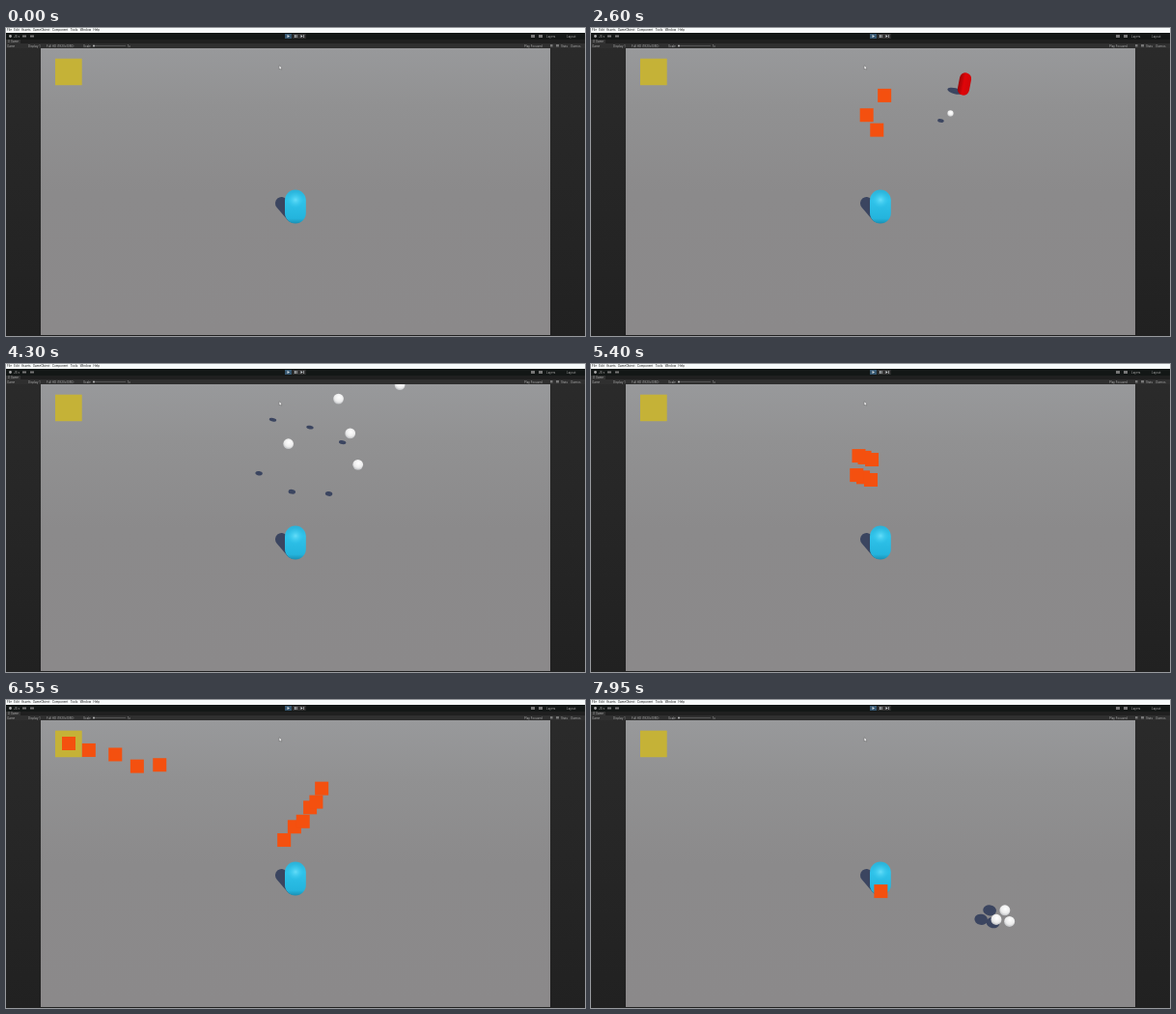
Animation of 600 by 319 pixels, one loop 8 s. Source, as an HTML page:

```html
<!DOCTYPE html>
<html lang="en">
<head>
<meta charset="utf-8">
<title>Loot pickup</title>
<style>
  html, body { margin: 0; width: 100%; height: 100%; overflow: hidden; background: #262626; }
  svg { display: block; width: 100vw; height: 100vh; }
  text { font: 3px Inter, Roboto, sans-serif; fill: #aaa; }
  .menu { fill: #111; word-spacing: 1.5px; }
</style>
</head>
<body>
<svg viewBox="0 0 600 319" preserveAspectRatio="none">
  <defs>
    <linearGradient id="ground" x1="0" y1="0" x2="0" y2="1">
      <stop offset="0" stop-color="#98999b"/>
      <stop offset=".2" stop-color="#919192"/>
      <stop offset=".5" stop-color="#8b8a8b"/>
      <stop offset="1" stop-color="#8b898a"/>
    </linearGradient>
    <linearGradient id="side" x1="0" y1="0" x2="0" y2="1">
      <stop offset="0" stop-color="#2b2b2b"/>
      <stop offset="1" stop-color="#212121"/>
    </linearGradient>
    <linearGradient id="blue" x1="0" y1="0" x2="0" y2="1">
      <stop offset="0" stop-color="#2bb2d8"/>
      <stop offset=".3" stop-color="#2fc3ea"/>
      <stop offset=".85" stop-color="#24b4dd"/>
      <stop offset="1" stop-color="#1a8fb3"/>
    </linearGradient>
    <radialGradient id="shine">
      <stop offset="0" stop-color="#6be0fa" stop-opacity=".9"/>
      <stop offset="1" stop-color="#3acbf0" stop-opacity="0"/>
    </radialGradient>
    <linearGradient id="red">
      <stop offset="0" stop-color="#9c0206"/>
      <stop offset=".45" stop-color="#e00509"/>
      <stop offset="1" stop-color="#d00408"/>
    </linearGradient>
    <radialGradient id="white" cx=".55" cy=".35" r=".7">
      <stop offset="0" stop-color="#fff"/>
      <stop offset=".6" stop-color="#ececec"/>
      <stop offset="1" stop-color="#b4b6ba"/>
    </radialGradient>
    <clipPath id="view"><rect x="36" y="21" width="528" height="297"/></clipPath>
  </defs>

  <rect width="600" height="319" fill="url(#side)"/>
  <rect width="600" height="5" fill="#f7fbfb"/>
  <rect y="5" width="600" height="7" fill="#131716"/>
  <rect y="12" width="600" height="4" fill="#202020"/>
  <rect y="16" width="600" height="5" fill="#2f2f2f"/>
  <rect y="12" width="15" height="4" fill="#333"/>
  <text class="menu" x="1" y="3.2">File Edit Assets GameObject Component Tools Window Help</text>
  <text y="9.6"><tspan x="8">JS ▾</tspan><tspan x="560">Layers</tspan><tspan x="581">Layout</tspan></text>
  <text x="2" y="15"># Game</text>
  <text y="19.6">
    <tspan x="1">Game</tspan><tspan x="23">Display 1</tspan><tspan x="42">Full HD (1920x1080)</tspan>
    <tspan x="80">Scale</tspan><tspan x="126">1x</tspan><tspan x="537">Play Focused</tspan>
    <tspan x="575">Stats</tspan><tspan x="585">Gizmos</tspan>
  </text>
  <path d="M90 18.5h34" stroke="#777" stroke-width=".5"/>
  <circle cx="91" cy="18.5" r="1" fill="#bbb"/>
  <circle cx="4.500" cy="8.500" r="1.400" fill="#aaa"/>
  <rect x="289" y="6" width="7" height="5" fill="#35566f"/>
  <rect x="296.700" y="6" width="14" height="5" fill="#333"/>
  <path d="M291.5 7v3l2.500-1.500zM299 7h.8v3h-.8zM300.700 7h.8v3h-.8zM305.500 7v3l2-1.500zM308 7h.6v3h-.6z" fill="#d5dce0"/>
  <path d="M17 7.500h4v2h-4zM25 7.500h4v2h-4zM544 7h4v3h-4zM552 7h4v3h-4zM564 17h2.500v2.500h-2.500zM570 17h3v2.500h-3z" fill="#777"/>

  <g clip-path="url(#view)">
    <rect x="36" y="21" width="528" height="297" fill="url(#ground)"/>
    <g id="world"></g>
    <g id="player">
      <path d="M285.500 181.500L297 195" stroke="#3b4560" stroke-width="13" stroke-linecap="round"/>
      <rect x="289" y="167.500" width="21.800" height="35" rx="10.900" fill="url(#blue)"/>
      <circle cx="300" cy="178" r="8.500" fill="url(#shine)"/>
    </g>
    <rect x="51" y="31.700" width="27.700" height="27.500" fill="#c5b237"/>
    <g id="ui"></g>
  </g>
  <path d="M283.200 38.800v4l1-.8.7 1.500.7-.4-.7-1.400h1.200z" fill="#fff" stroke="#333" stroke-width=".3"/>
</svg>
<script>
const LOOP = 8000, FLY = 1350, GAP = 40, RELOAD = 816;
const GOAL = [65, 45], MUZZLE = [300, 182];

// Each enemy appears, is shot, and bursts into n balls that land around `land`:
// spaced along `row` and pushed to either side by `zig`.
const waves = [
  { born: 910, dies: 1680, pos: [342, 78], r: 2.8, shade: [-11, 11],
    n: 3, first: 2147, gap: GAP, land: [280, 81], row: [6.5, 7.5], zig: [-6, 13] },
  { born: 2200, dies: 3480, pos: [387, 58], r: 2.8, shade: [-11, 11],
    n: 6, first: 5150, gap: GAP, land: [279, 106], row: [-4.5, -1.5], zig: [-2.5, 9.5] },
  { born: 5430, dies: 5600, pos: [318, 88], r: 3, shade: [-11, 11],
    n: 6, first: 5960, gap: 72, land: [293, 113], row: [25, -21], zig: [0, 2] },
  { born: 7760, dies: 7930, pos: [429, 226], r: 5.4, shade: [-15, -1],
    n: 3, first: 9400, gap: GAP, land: [300, 190], row: [5, 5], zig: [0, 0] }
];

const $ = id => document.getElementById(id);
const lerp = (a, b, u) => a + (b - a) * u;
const mix = (p, q, u) => p.map((v, i) => lerp(v, q[i], u));
const add = (p, q, k = 1) => p.map((v, i) => v + q[i] * k);
const inBack = u => u * u * (2.70158 * u - 1.70158);

// shadows flatten towards the horizon
const shadow = ([x, y], r) =>
  `<ellipse cx="${x}" cy="${y}" rx="${r * 1.25}" ry="${r * (.45 + .0025 * y)}" transform="rotate(10 ${x} ${y})" fill="#3b4560"/>`;
const ball = ([x, y], r) => `<circle cx="${x}" cy="${y}" r="${r}" fill="url(#white)"/>`;
const coin = ([x, y]) => `<rect x="${x - 7}" y="${y - 7}" width="14" height="14" fill="#f4500f"/>`;

function enemy({ pos: [x, y] }) {
  const size = .85 + y / 500, lean = (x - 300) / 8;
  return `<g transform="translate(${x} ${y}) scale(${size})">
    <ellipse cx="-10" cy="7.5" rx="8.5" ry="3.2" transform="rotate(14 -10 7.5)" fill="#3b4560"/>
    <rect x="-6.3" y="-12.2" width="12.6" height="24.4" rx="6.3" fill="url(#red)" transform="rotate(${lean})"/></g>`;
}

function shots({ born, dies, pos }, t, show) {
  const time = Math.min(400, dies - born);
  for (let hit = dies; hit - time >= born; hit -= RELOAD) {
    const u = 1 - (hit - t) / time;
    if (u < 0 || u >= 1) continue;
    const p = mix(MUZZLE, add(pos, [-1, 13]), u), r = lerp(4.5, 2.9, u);
    show(add(p, [-10, 7.5]), p, r, r * .85);
  }
}

function landing({ n, land, row, zig }, i) {
  return add(add(land, row, 2 * i / (n - 1) - 1), zig, i % 2 ? -1 : 1);
}

function drop(wave, i, end, t, show) {
  const { dies, pos, n, r, shade } = wave;
  const span = wave.first + wave.gap * i - dies, u = (t - dies) / span;
  const power = Math.sqrt(span / 1750), arc = Math.sin(Math.PI * u);
  const turn = Math.PI * (2 * i / n - 5 / 12);
  const spread = 6 * (1 - u) + 40 * power * arc;
  const start = add(pos, r > 5 ? [0, 1] : [-3, -3]);
  const base = add(mix(start, end, Math.sin(Math.PI * u / 2)), [Math.cos(turn), Math.sin(turn)], spread);
  const lift = (i % 2 ? 52 : 22) * power * arc;
  const size = r + 2.6 * arc;
  show(add(base, mix(shade, [-5, 5], u)), add(base, [lift, -lift]), size, Math.min(size, r + .2));
}

// a coin pulls back, then shoots off to the corner
function flight(start, from, t) {
  const u = (t - start) / FLY;
  return u < 0 || u > 1.02 ? '' : coin(mix(from, GOAL, inBack(Math.min(u, 1))));
}

function draw(t) {
  let dark = '', foes = '', balls = '', coins = '';
  const show = (ground, p, r, shadeR = r) => {
    dark += shadow(ground, shadeR);
    balls += ball(p, r);
  };
  for (const wave of waves) {
    if (t >= wave.born && t < wave.dies) foes += enemy(wave);
    shots(wave, t, show);
    for (let i = 0; i < wave.n; i++) {
      const lands = wave.first + wave.gap * i, end = landing(wave, i);
      if (t >= wave.dies && t < lands) drop(wave, i, end, t, show);
      coins += flight(lands, end, t);
    }
  }
  coins += flight(7700, [291, 192], t);
  $('world').innerHTML = dark + foes + balls;
  $('ui').innerHTML = coins;
}

const began = performance.now();
function tick() {
  draw((performance.now() - began) % LOOP);
  requestAnimationFrame(tick);
}
draw(0);
requestAnimationFrame(tick);
</script>
</body>
</html>
```
